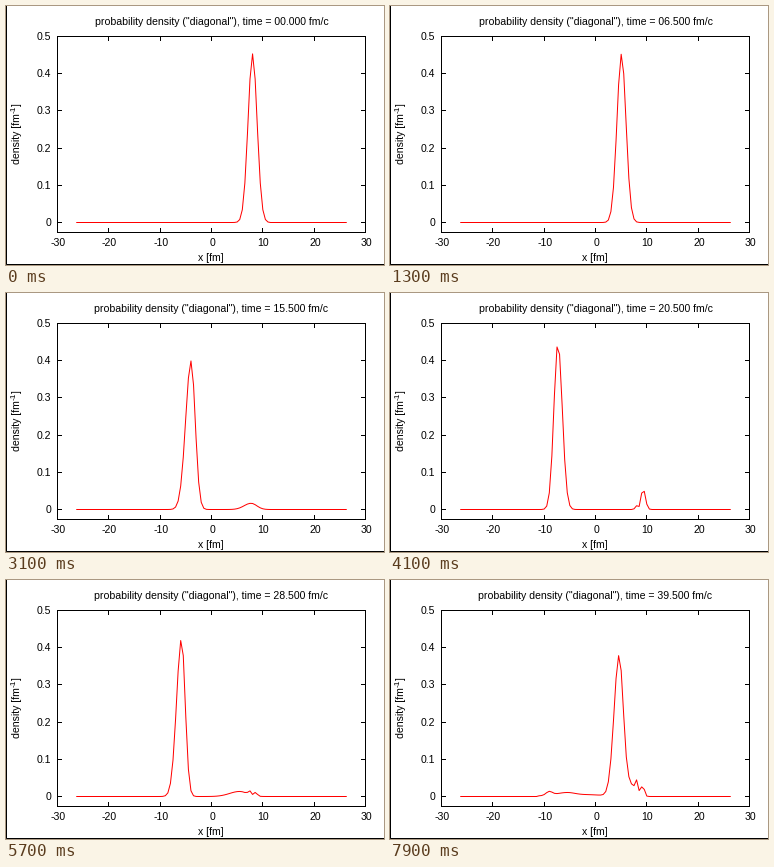
Animation of 378 by 259 pixels, one loop 8000 ms. Source, as a matplotlib script:

```python
import numpy as np
import matplotlib.pyplot as plt
from matplotlib.animation import FuncAnimation

W, H = 378, 259
FRAMES, STEP_MS, DT = 80, 100, 0.5
OMEGA = 0.1355  # oscillator frequency in c/fm
SIZE = 10.5

plt.rcParams["font.family"] = "Liberation Sans"

fig = plt.figure(figsize=(W / 72, H / 72), dpi=72, facecolor="white")
ax = fig.add_axes([0, 0, 1, 1])
ax.set_xlim(0, W)
ax.set_ylim(H, 0)
ax.axis("off")

LEFT, RIGHT, TOP, BOTTOM = 51.5, 359.5, 30.5, 226.5


def px(x):
    return LEFT + (x + 30) * (RIGHT - LEFT) / 60


def py(y):
    return 216.5 - 372 * y


def pixel(v):
    return np.floor(v) + 0.5


def line(xs, ys):
    ax.plot(xs, ys, color="black", lw=1, snap=False,
            solid_capstyle="projecting", solid_joinstyle="miter")


def label(x, y, s, ha="center", size=SIZE, **kw):
    return ax.text(x, y, s, fontsize=size, ha=ha, va="baseline", **kw)


# Page edge, plot box, mirrored inward ticks and labels
line([0.5, 0.5, W], [0, H - 0.5, H - 0.5])
line([LEFT, RIGHT, RIGHT, LEFT, LEFT], [TOP, TOP, BOTTOM, BOTTOM, TOP])
for v in range(-30, 31, 10):
    x = pixel(px(v))
    line([x, x], [BOTTOM, BOTTOM - 4])
    line([x, x], [TOP, TOP + 4])
    label(x + 0.5, 240, str(v))
for k in range(6):
    y = pixel(py(k / 10))
    line([LEFT, LEFT + 4], [y, y])
    line([RIGHT, RIGHT - 4], [y, y])
    label(45.5, y + 3.5, f"{k / 10:g}", ha="right")
label(205, 255, "x [fm]")
for x, y, s, size in ((14, 158, "density [fm", SIZE),
                      (9.5, 107, "-1", 8.4), (14, 99.5, "]", SIZE)):
    label(x, y, s, ha="left", size=size, rotation=90,
          rotation_mode="anchor")

title = label(205.5, 19, "")
curve, = ax.plot([], [], color="red", lw=1, snap=False)

grid = np.concatenate(([-26.25], np.arange(-26, 26.1, 0.5), [26.25]))


def ramp(t, start, end):
    u = np.clip((t - start) / (end - start), 0, 1)
    return u * u * (3 - 2 * u)


def bump(centre, height, left, right):
    d = grid - centre
    return height * np.exp(-0.5 * (d / np.where(d < 0, left, right)) ** 2)


def packet(t, centre):
    """Swinging wave packet that loses norm and breathes after the centre."""
    hit = ramp(t, 8, 14)
    norm = 1 - hit * (0.03 + 0.0026 * t)
    breath = -0.01 + 0.09 * np.cos(2 * OMEGA * (t - 35.5))
    width = 0.88 + hit * breath
    skew = hit * (0.05 + 0.1 * np.cos(0.44 * (t - 28.5)))
    height = norm / (np.sqrt(2 * np.pi) * width)
    return bump(centre, height, width * (1 + skew), width * (1 - skew))


def echo(t):
    """Reflected part: swings more slowly, sharpest at its turning point."""
    lag = t - 20.5
    spread = min(abs(lag), 8)
    height = 0.057 * ramp(t, 10, 17) / (1 + 0.4 * abs(lag))
    return bump(9.25 * np.cos(0.117 * lag), height,
                0.35 + 0.2 * spread, 0.45 + 0.13 * spread)


def ripples(t):
    late = ramp(t, 34, 39.5)
    sway = 0.6 * np.sin(np.pi * max(t - 20.5, 0) / 19)
    return sum(bump(x - sway, 0.01 * ramp(t, start, start + 3) + 0.02 * late,
                    0.27, 0.3)
               for x, start in ((8, 17.5), (9.2, 24)))


def wake(t, centre):
    """Tail behind the returning packet, left ripple and low plateau."""
    return (bump(centre + 2.3, 0.027 * ramp(t, 29, 39), 0.6, 1)
            + bump(-5.5 - 0.64 * (t - 34), 0.01 * ramp(t, 29, 34), 0.6, 0.6)
            + bump(-2, 0.005 * ramp(t, 34, 39), 6, 3.5))


def density(t):
    centre = (8 - 0.008 * t) * np.cos(OMEGA * t)
    rho = packet(t, centre) + echo(t) + ripples(t) + wake(t, centre)
    return np.where(np.abs(grid) < 11.2, rho, 0)


def update(i):
    t = i * DT
    title.set_text(f'probability density ("diagonal"), time = {t:06.3f} fm/c')
    curve.set_data(px(grid), py(density(t)))
    return title, curve


anim = FuncAnimation(fig, update, frames=FRAMES, interval=STEP_MS,
                     repeat=True, repeat_delay=0)
plt.show()
```
